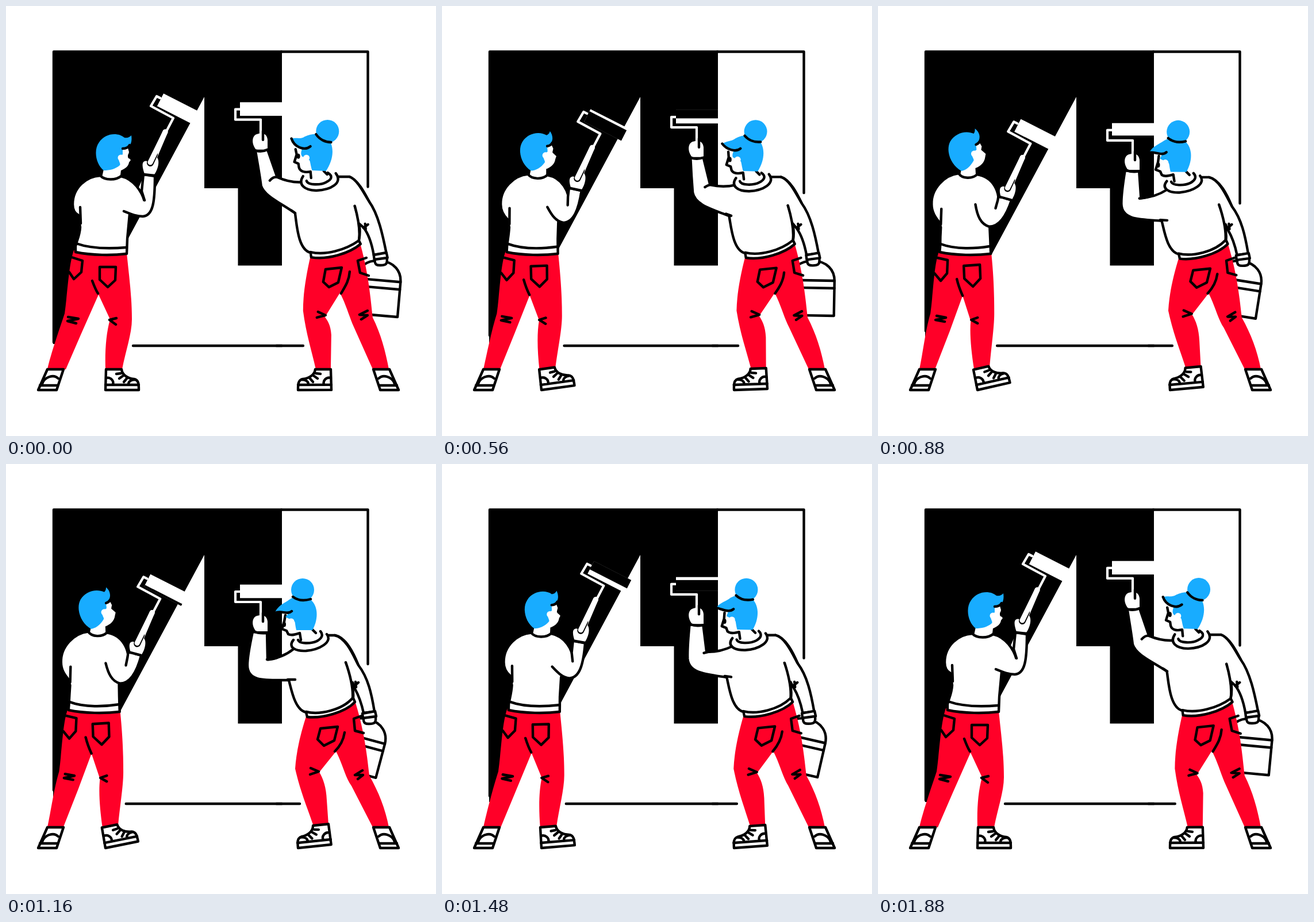
An HTML page without scripts for the animation above (1.92 s loop, 748 px wide and 748 px high).

```html
<!DOCTYPE html>
<html lang="en">
<head>
<meta charset="utf-8">
<title>Painters</title>
<style>
html,body{margin:0;width:100%;height:100%;overflow:hidden;background:#fff}
svg.stage{display:block;width:100%;height:100%}
.ln{fill:none;stroke:#000;stroke-width:4.4;stroke-linecap:round;stroke-linejoin:round}
.sk{fill:#fff;stroke:#000;stroke-width:4.4;stroke-linecap:round;stroke-linejoin:round}
.w{fill:#fff}
.wl{fill:none;stroke:#fff;stroke-width:4.2;stroke-linecap:round;stroke-linejoin:round}
.red{fill:#ff0028}
.blue{fill:#18acff}
/* --a / --b: shape up and down; --t / --r: shift and turn when down */
.man,.girl{animation:man 1.92s infinite cubic-bezier(.33,0,.67,1);animation-delay:-1.86s}
.girl{animation-name:girl}
@keyframes man{
  0%,92.7%,100%{d:var(--a);translate:0 0;rotate:0deg}
  45.8%,47.5%{d:var(--b);translate:var(--t);rotate:var(--r)}
}
@keyframes girl{
  0%,9.4%,100%{d:var(--a);translate:0 0;rotate:0deg}
  53%,59%{d:var(--b);translate:var(--t);rotate:var(--r)}
}
.swing{transform-origin:651px 440px;animation:swing 1.92s infinite linear}
@keyframes swing{
  0%,100%{rotate:5deg}
  18.75%{rotate:0deg}
  29.2%{rotate:1deg}
  45.8%{rotate:9deg}
  60.4%{rotate:15deg}
  77%{rotate:13deg}
  97.9%{rotate:5.4deg}
}
</style>
</head>
<body>
<svg class="stage" viewBox="0 0 748 748">
<defs>
  <g id="back" class="sk">
    <path d="M72 632H100L88 668H56Z"/>
    <path d="M59 660H90M63 657C67 645 83 640 91 648"/>
  </g>
  <g id="front" class="sk">
    <path d="M174 632H201C202 642 212 648 223 649C231 651 231 658 231 668H173Z"/>
    <path d="M173 659H231M174 647C182 645 188 652 186 658M213 658C213 653 218 650 225 650M192 640L200 639M197 648L204 643M205 654L210 648"/>
  </g>
</defs>

<!-- wall -->
<path d="M82 79H480V451.5H403.5V317H345V158L172 480L125 510L95 575L88 588H82Z"/>
<path class="ln man" style="--a:path('M83 585V79.5H479');--b:path('M83 565V79.5H479')"/>
<path class="ln girl" style="--a:path('M479 79.5H629.5V314');--b:path('M479 79.5H629.5V348')"/>
<path class="ln man" style="--a:path('M221 591H480');--b:path('M207 591H480')"/>
<path class="ln girl" style="--a:path('M470 591H517');--b:path('M470 591H511')"/>

<!-- man: roller -->
<g class="man" style="--t:-26px 45px">
  <path class="wl" d="M268 160L262 157L252 174L291 195L279 218"/>
  <path class="wl" style="stroke-width:9" d="M277 219L234 320"/>
  <g transform="translate(274 152) rotate(27)">
    <svg width="73" height="25">
      <rect class="w" width="73" height="25"/>
      <rect class="man" style="--t:0 61px" y="-32.4" width="73" height="26"/>
    </svg>
  </g>
</g>

<!-- man: legs -->
<path class="red man" style="--a:path('M118 425C109 450 107 500 102 535C92 565 78 605 72 632L104 632L130 572L161 502L181 545C174 570 172 600 173 632L202 632C208 600 219 570 219 545C219 505 214 470 210 430Z');--b:path('M106 427C97 450 96 500 91 535C82 565 78 605 72 632L99 632L125 565L147 504L161 548C159 570 162 600 167 632L194 630C196 600 202 560 202 535C202 500 201 470 197 430Z')"/>
<path class="ln man" style="--a:path('M114 437L133 443L131 463L118 475L110 463M163 454L191 454L190 477L177 489L163 476ZM150 478C153 486 156 494 160 500M108 541L126 544L107 548L122 552M192 543L180 546L191 554');--b:path('M103 438L121 442L120 465L109 478L98 465M149 452L177 450L178 474L165 488L150 474ZM137 475C139 484 143 495 147 504M102 539L118 542L100 546L116 549M173 542L162 546L173 552')"/>
<use href="#back"/>
<g class="man" style="--r:-13deg;transform-origin:173px 668px"><use href="#front"/></g>

<!-- man: head and body -->
<path class="w man" style="--a:path('M196 248L212 247L214 254L212 262L217 268L214 272C213 280 205 284 200 286L198 302L166 302L170 284Z');--b:path('M160 240L176 237L180 244L179 250L187 257L186 263C185 272 178 279 169 282L170 298L142 298L145 282Z')"/>
<path class="blue man" style="--a:path('M170 286C156 275 152 250 162 237C172 221 195 219 206 229C212 230 215 228 218 225C220 238 216 247 203 249L203 258L196 264C196 272 200 274 198 277C190 284 180 286 170 286Z');--b:path('M145 287C126 277 117 252 125 236C134 221 152 216 166 222C168 219 168 217 168 213C178 220 179 233 170 240L171 250L163 256C163 264 167 266 166 269C160 280 152 286 145 287Z')"/>
<circle class="w man" style="--t:-33px -7px" cx="200" cy="264" r="5.5"/>
<ellipse class="man" style="--t:-31px -13px" cx="215" cy="261" rx="3" ry="4.5"/>
<path class="ln man" style="--a:path('M203 248C208 248 213 246 215 242');--b:path('M170 241C173 240 175 238 176 236')"/>
<path class="sk man" style="--a:path('M164 295C140 296 116 316 116 345C116 356 120 361 126 364L129 385C128 400 123 408 121 418L121 428C150 434 185 434 210 431L211 405L215 362L241 340C236 322 222 301 200 296C192 303 172 304 164 295Z');--b:path('M140 291C115 294 92 318 93 345C93 359 100 368 106 376L109 385C108 400 108 408 108 418L107 428C135 434 170 434 196 431L195 405L194 385L208 352C214 322 199 297 172 293C164 301 146 301 140 291Z')"/>
<path class="ln man" style="--a:path('M129 350L130 378M122 413C150 423 185 422 209 420');--b:path('M110 353L109 380M109 414C135 424 170 422 194 418')"/>
<path class="sk man" style="--a:path('M205 357C220 363 228 366 238 366C256 365 259 340 259 296L239 293L236 322L241 338');--b:path('M169 345C172 365 178 380 193 384C212 384 224 362 232 338L209 332L208 338L204 352')"/>
<g class="man" style="--t:-26px 45px">
  <path class="w" d="M241 292C238 284 235 272 241 270C247 267 250 277 254 275C258 272 257 264 263 264C268 270 264 285 258 293Z"/>
  <path class="ln" style="stroke-width:12" d="M258 258L251 273"/>
  <path class="wl" style="stroke-width:9" d="M277 219L251 272"/>
</g>
<path class="ln man" style="--a:path('M240 293L259 295');--b:path('M210 332L231 338')"/>

<!-- woman: bucket -->
<g class="girl" style="--t:-20px 1px">
  <g class="swing sk">
    <path d="M640 538H690V478C690 458 676 443 652 443C630 443 614 455 614 478"/>
    <path d="M620 477H690M626 490H690"/>
  </g>
</g>

<!-- woman: legs -->
<path class="red girl" style="--a:path('M530 434C522 470 517 500 517 530C522 570 532 600 539 632L565 632L566 572C565 555 560 548 555 541L581 499C592 520 597 540 605 558L638 632L666 632C660 600 652 570 638 542C634 510 632 470 616 412Z');--b:path('M523 436C512 470 505 500 503 530C512 570 525 600 535 630L561 628L558 585C557 562 552 548 545 536L574 500C585 520 590 545 601 560L638 632L666 632C660 600 648 570 632 542C628 510 625 470 607 412Z')"/>
<path class="ln girl" style="--a:path('M556 458L584 455L578 481L562 489L552 480ZM627 438L612 443L616 464L631 469M598 462C597 478 590 488 583 500M543 532L556 538L541 542M629 530L615 537L629 538L618 545');--b:path('M547 460L577 457L571 481L553 490L542 479ZM619 438L605 443L607 464L622 468M589 467C587 480 580 492 572 500M530 529L544 535L529 540M620 533L607 541L621 541L612 548')"/>
<g transform="translate(739 0) scale(-1 1)">
  <use href="#back"/>
  <g class="girl" style="--r:6deg;transform-origin:231px 668px"><use href="#front"/></g>
</g>

<!-- woman: roller -->
<g class="girl" style="--t:0 43px">
  <path class="wl" d="M408 179H399V197H443V228"/>
  <svg x="407" y="166.5" width="73" height="24">
    <rect class="w" width="73" height="24"/>
    <rect class="girl" style="--t:0 100px" y="-64" width="73" height="46"/>
  </svg>
</g>

<!-- woman: body -->
<path class="sk girl" style="--a:path('M434 251C438 275 442 295 444 312C450 330 478 342 503 360C506 380 508 424 530 429L531 437C560 442 598 430 617 414L614 408C618 390 615 375 607 348L632 340C624 325 612 302 598 297L578 297L516 306C500 307 485 303 472 297L455 249Z');--b:path('M429 292C424 315 420 335 420 350C420 379 450 376 492 376C497 395 503 428 522 432L524 440C550 443 590 432 607 414L604 407C605 390 600 365 591 345L613 350C605 330 592 302 572 298L558 298L500 322C490 330 475 338 455 340L454 293Z')"/>
<path class="sk girl" style="--a:path('M598 297C612 302 624 328 632 340C648 362 656 400 662 430L640 433C636 410 630 395 622 385L614 378');--b:path('M572 298C592 302 605 335 613 350C630 372 636 400 641 431L622 433C617 410 612 400 607 391L603 380')"/>
<path class="ln girl" style="--a:path('M607 348C613 370 617 390 614 408C590 425 555 434 530 428M622 386L630 380M625 379L626 388M459 303C463 298 467 296 472 297M496 355L503 360');--b:path('M591 345C599 368 604 390 603 407C585 428 545 437 522 431M606 386L613 380M608 379L609 388M454 340C460 341 466 339 472 337M490 375L503 375')"/>
<g class="girl sk" style="--t:-20px 1px">
  <path d="M642 441C641 452 648 451 652 451C660 451 664 450 663 439"/>
  <path d="M640 433L662 429L664 438L641 441Z"/>
</g>
<g class="girl" style="--t:0 42px">
  <path class="w" d="M435 249C426 238 428 224 437 222C447 219 454 222 455 232L455 249Z"/>
  <path class="ln" d="M447 217V232"/>
</g>
<path class="ln girl" style="--a:path('M435 251C442 253 449 252 455 249');--b:path('M430 291C437 294 445 295 453 294')"/>

<!-- woman: head -->
<path class="sk girl" style="--a:path('M517 296C508 310 518 320 540 321C565 320 587 308 574 291');--b:path('M500 306C490 318 502 326 522 325C545 323 569 310 558 296')"/>
<path class="sk girl" style="--a:path('M504 249L506 258L502 271L509 274L510 281C512 288 520 290 530 288L531 299');--b:path('M486 263L484 274L480 287L488 290L491 296C497 299 505 296 511 294L513 306')"/>
<path class="ln girl" style="--a:path('M523 304C525 312 548 312 558 306C566 302 570 296 560 290');--b:path('M508 306C510 313 530 313 541 308C550 303 552 297 547 291')"/>
<path class="ln girl" style="--a:path('M553 287L559 293');--b:path('M533 288L539 294')"/>
<path class="blue girl" style="--a:path('M497 230C506 228 513 232 520 227C535 220 550 222 558 228C572 240 572 265 557 287L533 286C530 278 530 270 528 268L516 262C512 258 514 252 516 247C506 248 498 240 497 230Z');--b:path('M467 260C472 248 480 244 490 238C502 228 518 228 527 234C545 245 543 272 533 289L505 289C503 280 503 275 502 274L486 266C488 264 490 262 490 261C482 256 474 257 467 260Z')"/>
<circle class="w girl" style="--t:-27px 10px" cx="523" cy="264" r="5.5"/>
<ellipse class="girl" style="--t:-25px 18px" cx="509" cy="261" rx="3" ry="4.5"/>
<path class="ln girl" style="--a:path('M497 230C502 246 520 252 530 244');--b:path('M468 259C478 254 490 263 497 256')"/>
<circle class="blue girl" style="--t:-44px 1px" cx="560" cy="218" r="20"/>
<path class="ln girl" style="--a:path('M540 223C546 232 556 237 566 237');--b:path('M499 231C508 238 520 238 530 235')"/>
</svg>
</body>
</html>
```
